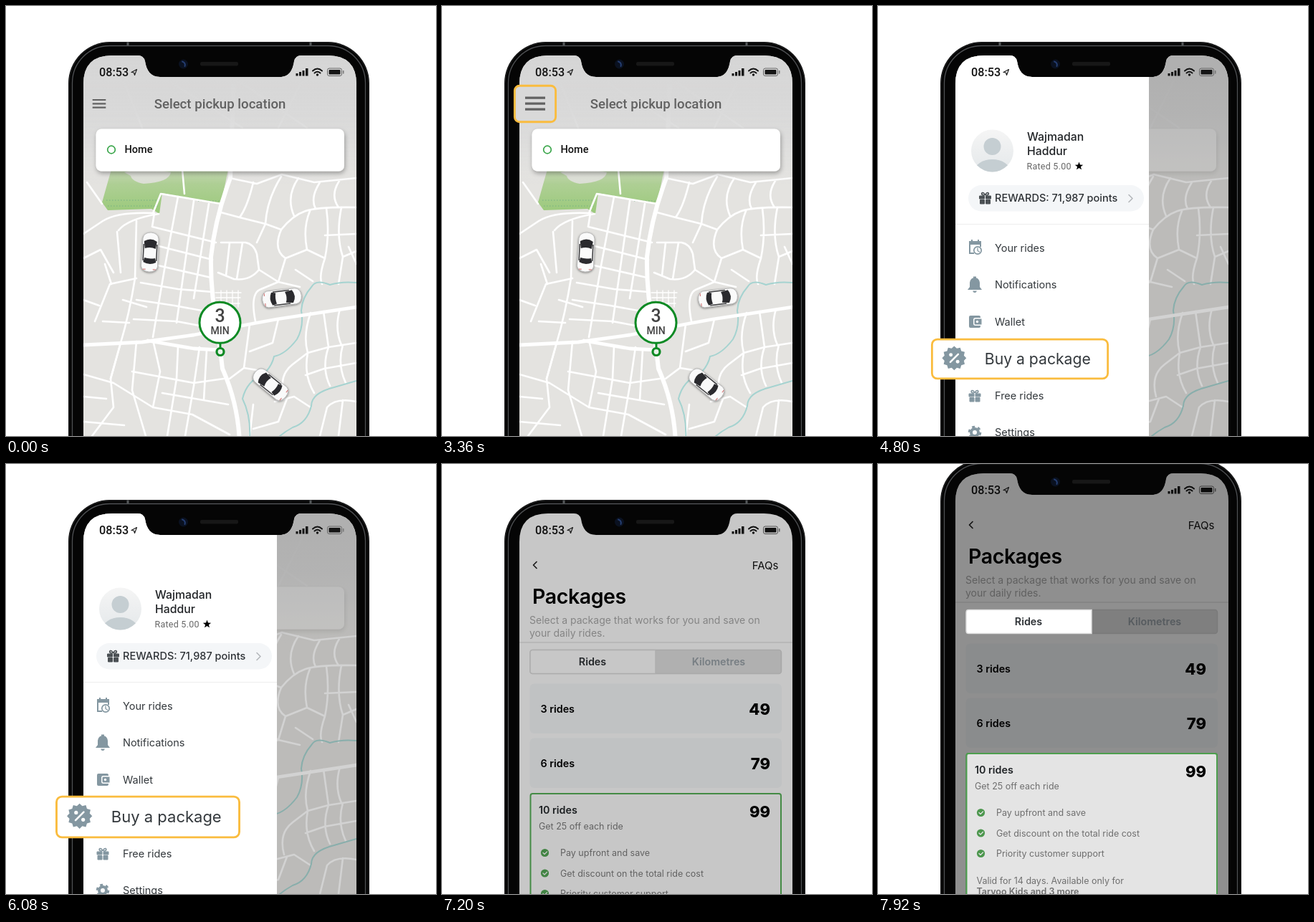
Write an HTML page that moves like this. It is 600x600 px and loops after 8000 ms.

```html
<!DOCTYPE html>
<html lang="en">
<head>
<meta charset="utf-8">
<title>Ride packages</title>
<style>
html, body { margin: 0; width: 100%; height: 100%; overflow: hidden; background: #fff; }
svg { display: block; width: 100%; height: 100%; }
text { font-family: Inter, sans-serif; }
.rb { font-family: Roboto, sans-serif; font-weight: 500; }
.b { font-weight: 600; }
.road, .line { fill: none; stroke-linecap: round; stroke-linejoin: round; }
.road { stroke: #fff; stroke-width: 2.6; }
.river { fill: none; stroke: #a5d3d0; stroke-width: 2; }
.row { font-size: 14.5px; fill: #33383c; }
.icon { fill: #8497a1; }
.price { font-size: 22px; font-weight: 800; text-anchor: end; }
.name { font-size: 14.3px; font-weight: 600; }
.note { font-size: 12.5px; fill: #7d7d7d; }
.frame { fill: #fff; stroke: #fabc3e; stroke-width: 1.9; }
</style>
</head>
<body>
<svg viewBox="0 0 600 600">
<defs>
  <clipPath id="screen"><path d="M108 109Q108 69 148 69H184Q192 69 194 77C196 90 202 99 215 99H382C395 99 400 90 402 77Q404 69 412 69H449Q489 69 489 109V760H108Z"/></clipPath>
  <clipPath id="face"><circle cx="159.5" cy="202" r="29.5"/></clipPath>
  <linearGradient id="haze" x2="0" y2="1">
    <stop offset="0" stop-color="#d5d5d5"/>
    <stop offset=".45" stop-color="#d8d8d8" stop-opacity=".94"/>
    <stop offset=".65" stop-color="#dadada" stop-opacity=".78"/>
    <stop offset="1" stop-color="#e0e0e0" stop-opacity="0"/>
  </linearGradient>
  <linearGradient id="grass" x2="0" y2="1"><stop offset="0" stop-color="#b8d2a1"/><stop offset="1" stop-color="#9ac97a"/></linearGradient>
  <linearGradient id="disc" x2="0" y2="1"><stop offset="0" stop-color="#f5f5f5"/><stop offset="1" stop-color="#e4e8ea"/></linearGradient>
  <filter id="soft" x="-20%" y="-30%" width="140%" height="170%"><feDropShadow dx="1" dy="3" stdDeviation="3" flood-opacity=".32"/></filter>
  <filter id="near" x="-40%" y="-30%" width="180%" height="160%"><feDropShadow dx="0" dy="1" stdDeviation="1.5" flood-opacity=".5"/></filter>
  <g id="car">
    <path d="M-11-19Q-10-27 0-27.500Q10-27 11-19L11.500 20Q10 27 0 27.500Q-10 27-11.500 20Z" fill="#fafafa" stroke="#aaa" stroke-width=".7"/>
    <path d="M-9-15Q0-21 9-15L7.500-5Q0-8-7.500-5ZM-7.500 8Q0 10 7.500 8L9 14Q0 19-9 14Z" fill="#2b2b2d"/>
    <path d="M-9.300-11V12M9.300-11V12" stroke="#3a3a3c" stroke-width="1.500"/>
    <path d="M-9 24H-5M5 24H9" stroke="#d06a6a"/>
  </g>
  <g id="gift">
    <path d="M-8-3H-1V1H-8ZM1-3H8V1H1ZM-7 2.500H-1V8H-7ZM1 2.500H7V8H1Z"/>
    <path d="M-1-4C-7-4-5-9-2-7L0-4.500 2-7C5-9 7-4 1-4" fill="none" stroke-width="1.600"/>
  </g>
  <g id="rides">
    <path d="M298 259.500H126.500Q123 259.500 123 263V289Q123 292.500 126.500 292.500H298Z" fill="#fff" stroke="#dedede" stroke-width="1.500"/>
    <text x="210" y="281" text-anchor="middle" class="name" fill="#2d3135">Rides</text>
  </g>
  <g id="best">
    <rect x="123.500" y="460" width="349.500" height="240" rx="3" fill="#fff" stroke="#57b258" stroke-width="2"/>
    <text x="135" y="488" class="name" fill="#25292c">10 rides</text>
    <text x="135" y="509.500" class="note">Get 25 off each ride</text>
    <text x="458" y="492.500" class="price">99</text>
    <g id="perks"></g>
    <text x="137.500" y="641.500" class="note">Valid for 14 days. Available only for</text>
    <text x="137.500" y="657" class="note b">Tarvoo Kids and 3 more</text>
  </g>
</defs>
<rect width="600" height="600" fill="#fff"/>
<g id="phone">
  <rect x="87" y="50" width="420" height="800" rx="58" fill="#050505"/>
  <rect x="88" y="51" width="418" height="800" rx="57" fill="none" stroke="#262728"/>
  <rect x="92.500" y="55.500" width="409" height="800" rx="52" fill="none" stroke="#4e5053" stroke-width="1.300"/>
  <path d="M170 50.500V55M425 50.500V55" stroke="#55585a" stroke-width="3"/>
  <g clip-path="url(#screen)">
    <g id="map">
      <rect x="108" y="69" width="381" height="700" fill="#e4e3e0"/>
      <path d="M147 228H310L303 262 298 275 262 270 218 261 214 290 203 283 142 285 134 274Z" fill="url(#grass)"/>
      <path d="M140 271H214M142 279H213M268 272H298" stroke="#74b083" stroke-dasharray="1.500 2.500"/>
      <path d="M165 232Q190 224 230 232 228 246 192 248 176 245 174 237Z" fill="#dcdfd5"/>
      <g class="road">
        <path d="M108 318L135 300Q155 287 205 289L216 262 300 276M134 276L113 246M157 313Q170 297 213 290M155 315L160 372M108 352L132 340 150 372M124 440L145 388 182 380M147 388L138 360M108 410L130 418M182 300L180 380Q172 430 160 470L146 520M163 410L196 420M135 440L172 442"/>
        <path d="M207 289L204 308 293 330M213 335L288 354M212 362L286 379M188 386L240 395 288 399M182 410L235 418 290 428M178 437L238 440 270 446M240 266L222 362M262 272L238 442M283 276L262 408M222 362L205 462"/>
        <path d="M108 514L150 526 205 560 260 570 312 598M160 470L146 520 150 560 120 600M182 468L176 536 195 600M205 466L215 510 205 560M240 476L238 520 225 600M270 476L262 530 250 600M108 545L140 548M176 510L262 526 304 520M218 540L310 556M280 480L276 550M108 580L165 585"/>
        <path d="M246 228L249 262M312 240L350 248 385 235 430 246 489 240M345 246Q337 280 326 295L300 288M326 295L362 304 384 312Q400 292 418 286T489 281M384 238Q364 270 362 304L350 330M408 240Q390 266 402 293M438 246Q424 268 432 283M465 244Q452 264 464 281M300 330H334Q346 332 350 346L353 368Q340 384 318 381L296 372M312 330L307 376M330 330L322 381"/>
        <path d="M384 312Q372 340 390 352L380 385 356 395M390 352L420 340Q414 310 424 286M420 340L445 352Q436 378 441 388M445 352Q452 318 447 282M445 320L489 318M468 281Q460 320 470 350L464 388M470 350L489 342M353 368L380 385 410 392M356 395Q340 400 348 440M404 368L428 384M489 360L478 336"/>
        <path d="M425 428Q414 460 421 484L400 500Q380 515 388 545M421 484L450 476 443 426M450 476L489 470M466 423Q458 450 468 473M421 484Q415 515 430 540M450 476Q440 505 452 530M470 473Q462 500 474 526M489 498L444 506 418 515M489 552Q460 546 448 560L438 600M470 550L464 600M425 560L402 545 375 552M380 437L372 470 340 482M340 444L332 505 312 520M332 505L362 510M392 548L380 580 345 590M345 556L340 600"/>
      </g>
      <path d="M292 400H328M293 407H327M292 415H326M300 397V420M308 397V421M316 397V421M324 397V420" class="road" style="stroke-width:1.300"/>
      <path class="river" d="M489 386Q468 384 452 389 433 381 427 391 413 407 412 425 416 447 406 465 390 486 374 489 371 503 359 514 336 523 330 548 342 572 340 605M489 523L458 532Q426 540 426 558 420 582 400 588 382 598 372 610"/>
      <path class="road" style="stroke-width:4.800" d="M108 473L190 469 262 459 345 443 378 437 489 420M198 467L262 478 298 480"/>
      <path class="road" style="stroke-width:6" d="M319 70L313 240Q292 295 286 350 285 400 296 455L302 506Q324 555 326 610"/>
      <g id="cars" filter="url(#near)">
        <use href="#car" transform="translate(201 343.500) rotate(3)"/>
        <use href="#car" transform="translate(385 407) rotate(83)"/>
        <use href="#car" transform="translate(369 528) rotate(-51)"/>
      </g>
      <g id="pin" stroke="#0d8a24">
        <path d="M299 470V478" stroke-width="3"/>
        <circle cx="299" cy="482.500" r="5" fill="#e9f3e9" stroke-width="3.200"/>
        <circle cx="298.500" cy="441.800" r="28.500" fill="#fff" stroke-width="3"/>
        <g text-anchor="middle" fill="#444" stroke="none">
          <text class="rb" x="298.500" y="441" font-size="25">3</text>
          <text class="rb" x="298.500" y="458" font-size="14">MIN</text>
        </g>
      </g>
      <path d="M150 69L190 170M220 100L330 170M318 100L420 170M430 70L380 170" class="road"/>
      <rect x="108" y="69" width="381" height="180" fill="url(#haze)"/>
      <g id="place">
        <rect x="125.500" y="171.500" width="346.500" height="59" rx="8" fill="#fff" filter="url(#soft)"/>
        <circle cx="147" cy="200.500" r="5.300" fill="none" stroke="#3ba64b" stroke-width="1.700"/>
        <text x="165.500" y="205" class="rb" font-size="14.500" fill="#111">Home</text>
      </g>
      <text id="heading" x="298.500" y="143" text-anchor="middle" class="rb" font-size="18.600" fill="#616161">Select pickup location</text>
    </g>
    <g id="drawer">
      <rect x="108" y="69" width="381" height="700" opacity=".175"/>
      <rect x="108" y="69" width="270" height="700" fill="#fff"/>
      <circle cx="159.500" cy="202" r="29.500" fill="url(#disc)"/>
      <g clip-path="url(#face)" fill="#c5ced2"><circle cx="159.500" cy="196" r="12"/><ellipse cx="159.500" cy="231" rx="25" ry="17"/></g>
      <g font-size="15.800" font-weight="500" fill="#202326"><text x="208" y="188">Wajmadan</text><text x="208" y="208">Haddur</text></g>
      <text x="207.500" y="227.500" class="rb" style="font-weight:400" font-size="12.500" letter-spacing=".25" fill="#666">Rated 5.00</text>
      <path id="star"/>
      <rect x="126" y="250" width="245" height="36.500" rx="18.200" fill="#f4f6f8"/>
      <use href="#gift" x="149.500" y="268" fill="#4b5054" stroke="#4b5054"/>
      <text x="163" y="273" font-size="14.500" font-weight="500" fill="#2d3135">REWARDS: 71,987 points</text>
      <path class="line" d="M350 263.500L355 268.500 350 273.500" stroke="#b4b7ba" stroke-width="1.600"/>
      <path d="M108 304.500H378" stroke="#eee"/>
      <g id="rows"></g>
      <g class="icon">
        <path d="M127 328H144V336H142V333H129V344H134V346H127ZM130 326H132V329H130ZM139 326H141V329H139Z"/>
        <circle cx="139" cy="341" r="5.200" fill="#fff" stroke="#8497a1" stroke-width="1.700"/>
        <path class="line" d="M139 338V341.500L141.500 343" stroke="#8497a1" stroke-width="1.300"/>
        <path d="M125 396L128 392V386Q129 380 133 379.500V377.500H137V379.500Q141 380 142 386V392L145 396ZM132 397.500H138Q137 400 135 400T132 397.500Z"/>
        <path d="M129 432H141Q143 432 143 434V435H136Q133 435 133 438V443Q133 446 136 446H143V447Q143 449 141 449H129Q127 449 127 447V434Q127 432 129 432ZM136 436.500H144.500V444.500H136Q134.500 444.500 134.500 443V438Q134.500 436.500 136 436.500Z"/>
        <circle cx="138.500" cy="440.500" r="1.700" fill="#fff"/>
        <use href="#gift" x="135" y="544" stroke="#8497a1"/>
        <circle cx="135" cy="595" r="5" fill="none" stroke="#8497a1" stroke-width="4"/>
        <circle cx="135" cy="595" r="7.800" fill="none" stroke="#8497a1" stroke-width="3" stroke-dasharray="4 4.170"/>
      </g>
    </g>
    <g id="packages">
      <rect x="108" y="69" width="381" height="700" fill="#fff"/>
      <path class="line" d="M132 136.500L127.500 141 132 145.500" stroke="#222" stroke-width="1.700"/>
      <text x="469.500" y="146.500" text-anchor="end" font-size="15" fill="#151515">FAQs</text>
      <text x="126" y="194.500" class="b" font-size="28.500" letter-spacing="-.4">Packages</text>
      <g font-size="14" fill="#a9a9a9"><text x="122" y="223">Select a package that works for you and save on</text><text x="122" y="240.500">your daily rides.</text></g>
      <path d="M108 249H489" stroke="#e6e6e6" stroke-width="1.500"/>
      <rect x="123" y="259.500" width="350.500" height="33" rx="3.500" fill="#e1e1e1" stroke="#d8d8d8" stroke-width="1.500"/>
      <text x="386" y="281" text-anchor="middle" class="name" fill="#98a1a8">Kilometres</text>
      <use href="#rides"/>
      <g fill="#f6f8fa"><rect x="122.500" y="306.500" width="351.500" height="69.500" rx="6"/><rect x="122.500" y="382.500" width="351.500" height="69.500" rx="6"/></g>
      <text x="137.500" y="346.500" class="name">3 rides</text><text x="458" y="349.500" class="price">49</text>
      <text x="137.500" y="422.500" class="name">6 rides</text><text x="458" y="425.500" class="price">79</text>
      <use href="#best"/>
    </g>
    <g id="status" fill="#151515">
      <text x="130" y="98" class="rb" font-size="16.200">08:53</text>
      <path class="line" d="M182.500 88.500L175 92.500 178.500 93 179.500 96.500Z" stroke="#222" stroke-width="1.200"/>
      <path d="M404.500 94H407.500V97.500H404.500ZM409 92H412V97.500H409ZM413.500 90H416.500V97.500H413.500ZM418 87H421.500V97.500H418Z"/>
      <path class="line" d="M428 90.500Q434.500 84.500 441 90.500M430.500 93.500Q434.500 90 438.500 93.500" stroke="#151515" stroke-width="2"/>
      <circle cx="434.500" cy="96" r="1.700"/>
      <rect x="448.500" y="87" width="20" height="10.500" rx="2.500" fill="none" stroke="#666"/>
      <rect x="450.500" y="89" width="16" height="6.500" rx="1"/>
      <rect x="470" y="90" width="1.500" height="4.500" fill="#777"/>
    </g>
    <rect id="dim" x="108" y="69" width="381" height="700"/>
    <use id="rides-lit" href="#rides"/>
    <use id="best-lit" href="#best"/>
  </g>
  <circle cx="247.500" cy="81" r="6.500" fill="#0a1120"/>
  <path class="line" d="M246 77.500Q251 79 249.500 84" stroke="#243d70" stroke-width="2"/>
  <rect x="271" y="78" width="53" height="5.500" rx="2" fill="#171717"/>
</g>
<g id="menu">
  <rect class="frame" x="-19" y="-16.800" width="38" height="33.600" rx="4.500" style="fill:#d9d9d9"/>
  <path d="M-9.300-5.500H9.300M-9.300-.2H9.300M-9.300 5.100H9.300" stroke="#626262" stroke-width="2.200"/>
</g>
<g id="offer">
  <rect class="frame" x="-84" y="-18.700" width="168" height="37.400" rx="5"/>
  <path id="badge" class="icon"/>
  <path class="line" d="M-66.500 3L-59 -4.500" stroke="#fff" stroke-width="1.700"/>
  <g fill="#fff"><circle cx="-66" cy="-4" r="1.700"/><circle cx="-59.500" cy="2.500" r="1.700"/></g>
  <text x="-33.700" y="4.800" class="row">Buy a package</text>
</g>
</svg>
<script>
const LOOP = 8000, STEP = 80;
const $ = id => document.getElementById(id);
const show = (id, on) => $(id).style.display = on ? '' : 'none';
const fade = (el, v) => el.setAttribute('opacity', v);

function spikes(cx, cy, n, outer, inner) {
  const points = Array.from({ length: n * 2 }, (_, i) => {
    const r = i % 2 ? inner : outer, a = i * Math.PI / n - Math.PI / 2;
    return `${(cx + r * Math.cos(a)).toFixed(2)} ${(cy + r * Math.sin(a)).toFixed(2)}`;
  });
  return `M${points.join('L')}Z`;
}
$('star').setAttribute('d', spikes(280.5, 223.5, 5, 6, 2.5));
$('badge').setAttribute('d', spikes(-62.8, -0.8, 12, 11.6, 9.6));

const rows = { 'Your rides': 337.5, Notifications: 389, Wallet: 440.5, 'Free rides': 543.5, Settings: 595 };
$('rows').innerHTML = Object.entries(rows)
  .map(([label, y]) => `<text class="row" x="163" y="${y + 5}">${label}</text>`).join('');

$('perks').innerHTML = ['Pay upfront and save', 'Get discount on the total ride cost', 'Priority customer support']
  .map((label, i) => {
    const y = 542.5 + i * 28.5;
    return `<circle cx="143.5" cy="${y}" r="5.6" fill="#55a957"/>
      <path class="line" d="M141 ${y}l2 2 3.500-3.500" stroke="#fff" stroke-width="1.300"/>
      <text class="note" x="165" y="${y + 4.5}">${label}</text>`;
  }).join('');

const smooth = p => p * p * (3 - 2 * p);
const linear = p => p;

// Value at time t from [time, value] steps.
function track(t, steps, ease = smooth) {
  if (t <= steps[0][0]) return steps[0][1];
  for (let i = 1; i < steps.length; i++) {
    const [t0, a] = steps[i - 1], [t1, b] = steps[i];
    if (t < t1) return a + (b - a) * ease((t - t0) / (t1 - t0));
  }
  return steps[steps.length - 1][1];
}

// Pops a framed item up to full size, then drops it back.
function pop(id, t, x, y, { start, settle, leave, end, size, peak }) {
  const top = start + (settle - start) * 0.55, dip = leave + (end - leave) * 0.45;
  const scale = track(t, [[start, 1], [top, peak], [settle, size], [leave, size], [dip, peak], [end, 1]]);
  const alpha = track(t, [[start, 0], [top, 1], [dip, 1], [end, 0.2]], linear);
  $(id).setAttribute('transform', `translate(${x} ${y}) scale(${scale})`);
  fade($(id).firstElementChild, alpha);
}

function draw(t) {
  const drawer = t >= 4080 && t < 6640, packages = t >= 6640;
  show('map', !packages);
  for (const id of ['heading', 'pin', 'cars']) show(id, !drawer);
  fade($('place'), drawer ? 0.3 : 1);
  show('drawer', drawer);
  show('packages', packages);
  show('menu', t < 4080);
  show('offer', drawer);

  pop('menu', t, 130, 136.5, { start: 560, settle: 1360, leave: 3280, end: 4000, size: 1.48, peak: 1.65 });
  pop('offer', t, 198, 492.5, { start: 4240, settle: 4800, leave: 5920, end: 6560, size: 1.46, peak: 1.56 });

  fade($('dim'), track(t, [[7040, 0], [7360, 0.44]], linear));
  fade($('rides-lit'), track(t, [[7440, 0], [7920, 1]], linear));
  fade($('best-lit'), track(t, [[7440, 0], [7920, 0.76]], linear));
  const rise = track(t, [[7440, 0], [7920, 56]], p => p ** 1.7);
  $('phone').setAttribute('transform', `translate(0 ${-rise})`);
}

function tick() {
  const t = performance.now() % LOOP;
  draw(Math.floor(t / STEP) * STEP);
  requestAnimationFrame(tick);
}
tick();
</script>
</body>
</html>
```
